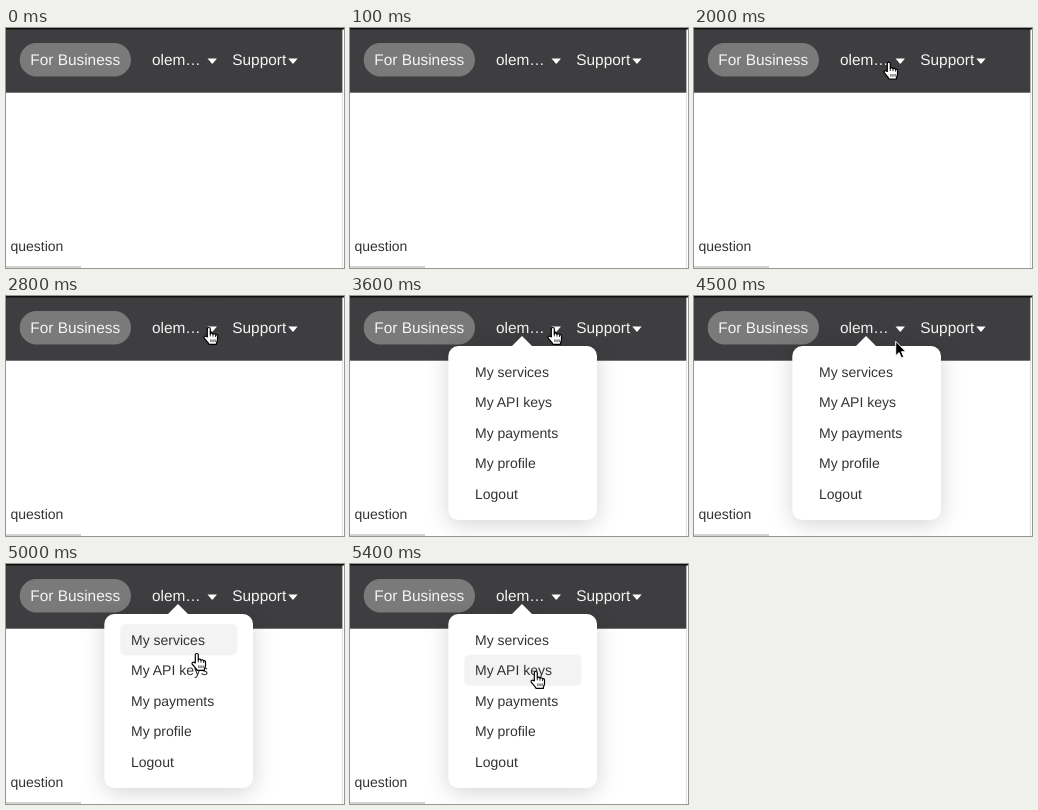
Write an HTML page that moves like this. It is 338 by 240 pixels and loops after 5700 ms.

```html
<!DOCTYPE html>
<html lang="en">
<head>
<meta charset="utf-8">
<title>Account menu</title>
<style>
  html, body { margin: 0; width: 100%; height: 100%; overflow: hidden; background: #fff; }
  svg { display: block; width: 338px; height: 240px; }
  text { font: 14px "Liberation Sans", Arial, sans-serif; fill: #333; text-rendering: geometricPrecision; }
  .bar text { font-size: 15.4px; fill: #f4f4f4; }
  #menu { filter: drop-shadow(0 4px 11px rgba(0, 0, 0, .17)); }
</style>
</head>
<body>
<svg viewBox="0 0 338 240">
  <path d="M336.5 65V240" stroke="#e2e2e2"/>
  <g class="bar">
    <rect width="336.4" height="64.7" fill="#3e3d3f"/>
    <rect width="338" height="1.5" fill="#111"/>
    <rect x="13.7" y="15" width="111.3" height="33.5" rx="16.75" fill="#7b7a7b"/>
    <text x="24.3" y="37.2">For Business</text>
    <text x="146" y="37.2">olem…</text>
    <text x="226.3" y="37.2">Support</text>
    <path id="caret" d="M201.5 30.5h9.5l-4.75 5.5z" fill="#fff"/>
    <use href="#caret" x="80.7"/>
  </g>
  <text x="4.4" y="223.3">question</text>
  <path d="M0 239H75" stroke="#c4c4c4" stroke-width="1.5"/>

  <g id="menu">
    <rect x="98.3" y="50" width="148.7" height="174" rx="10" fill="#fff"/>
    <path d="M161.5 50.5L172 40L182.5 50.5z" fill="#fff"/>
    <rect id="hover" x="114.3" width="117" height="31" rx="5" fill="#f3f3f3"/>
  </g>

  <g id="arrow">
    <path d="M0 0V14.5L3.4 11.3L5.7 16.6L8.1 15.6L5.8 10.4H10.3z" fill="#000" stroke="#fff"/>
  </g>
  <g id="hand" stroke="#000" stroke-linejoin="round">
    <path fill="#fff" stroke-width="1.2" d="M-1.7 9.5V1.6a1.5 1.5 0 0 1 3 0V6.6a1.4 1.4 0 0 1 2.7 .3a1.4 1.4 0 0 1 2.5 .6a1.3 1.3 0 0 1 2 1.2V12c0 2-1.2 2.6-1.2 5H0c-.6-2-3.2-4-4.8-6.3c-.8-1.5 1.1-2.5 2.2-1.6z"/>
    <path d="M1.3 6v3M4 7v2.3M6.5 7.8v1.8M1.9 12v2.7M4 12v2.7M6.1 12v2.7" stroke-width=".8"/>
  </g>
</svg>
<script>
const LOOP = 5700, STEP = 100, ENTER = 1600, MENU_OPEN = 3600;
const MENU_TOP = 60, ROW = 30.5;
const $ = id => document.getElementById(id);
const menu = $("menu"), hover = $("hover");
const cursors = { arrow: $("arrow"), hand: $("hand") };

["My services", "My API keys", "My payments", "My profile", "Logout"].forEach((label, i) => {
  const text = document.createElementNS("http://www.w3.org/2000/svg", "text");
  text.setAttribute("x", 125);
  text.setAttribute("y", MENU_TOP + 20.7 + i * ROW);
  text.textContent = label;
  menu.append(text);
});

// Replays every move up to t; x gathers speed while y runs evenly, so the path bends.
function pointerAt(t) {
  let x = 204, y = 3.5;
  const move = (start, end, toX, toY) => {
    const k = Math.min(1, Math.max(0, (t - start) / (end - start)));
    x += (toX - x) * k * k;
    y += (toY - y) * k;
  };
  move(ENTER, 2000, 195, 34);
  move(2200, 2500, 203, 31.4);
  move(4400, 4800, 182, 87);
  move(4800, 5000, 191, 89.4);
  move(5000, 5400, 186, 107.4);
  return [x, y];
}

const show = (el, on) => { el.style.display = on ? "" : "none"; };

function draw(now) {
  const t = Math.floor(now % LOOP / STEP) * STEP;
  const open = t >= MENU_OPEN;
  const [x, y] = pointerAt(t);
  const item = open ? Math.floor((y - MENU_TOP) / ROW) : -1;
  const overLink = item >= 0 || y > 20 && y < 40;

  show(menu, open);
  show(hover, item >= 0);
  hover.setAttribute("y", MENU_TOP + .3 + item * ROW);
  show(cursors.arrow, t >= ENTER && !overLink);
  show(cursors.hand, t >= ENTER && overLink);
  for (const cursor of Object.values(cursors)) {
    cursor.setAttribute("transform", `translate(${x} ${y})`);
  }
  requestAnimationFrame(draw);
}
draw(performance.now());
</script>
</body>
</html>
```
